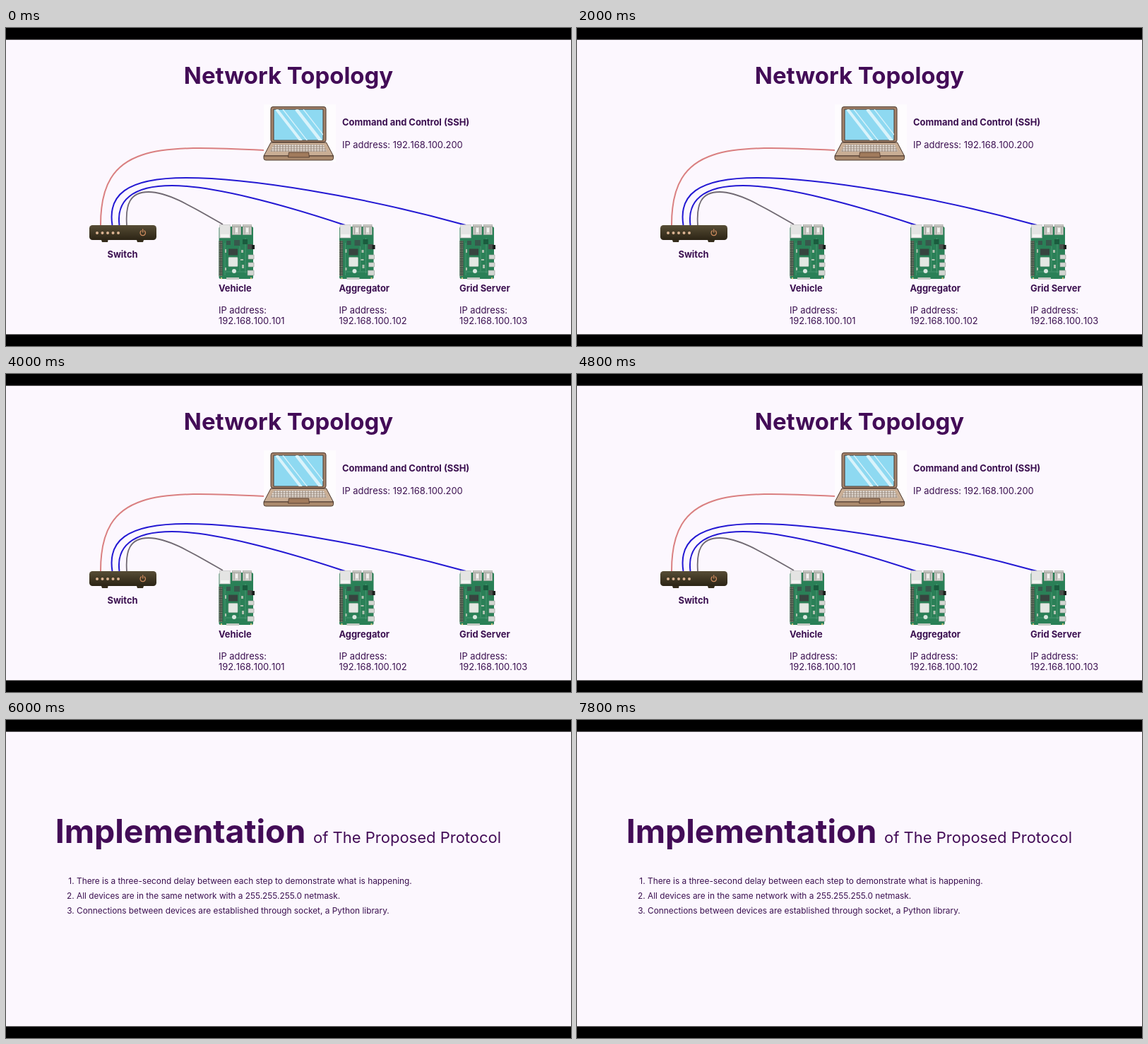
An HTML page for the animation above (8 s loop, 800 by 450 pixels).

```html
<!DOCTYPE html>
<html lang="en">
<head>
<meta charset="utf-8">
<title>Network Topology</title>
<style>
  html, body { margin: 0; width: 100%; height: 100%; overflow: hidden; background: #000; }
  svg { display: block; width: 100vw; height: 100vh; }
  text { font-family: Inter, sans-serif; font-optical-sizing: none; fill: #430c57; }
  .title { font-size: 32.95px; font-weight: 700; }
  .headline { font-size: 46.4px; font-weight: 700; }
  .subhead { font-size: 22px; }
  .label { font-size: 12.9px; fill: #3b1050; }
  .address { font-kerning: none; }
  .name { font-weight: 700; }
  .list { font-size: 11.85px; fill: #3b1050; }
  .cable { fill: none; stroke-width: 2; }
</style>
</head>
<body>
<svg viewBox="0 0 800 450">
  <defs>
    <pattern id="keys" width="4" height="3" patternUnits="userSpaceOnUse">
      <path d="M0 0h4v3h-4z" fill="#8d7b6d"/>
      <path d="M.4 .4h3.1v2.1h-3.1z" fill="#f1ebe5"/>
    </pattern>
    <pattern id="pins" width="2.6" height="2.6" patternUnits="userSpaceOnUse">
      <path d="M0 0h2.6v2.6h-2.6z" fill="#3d4d44"/>
      <circle cx="1.3" cy="1.3" r=".7" fill="#b5b394"/>
    </pattern>
    <linearGradient id="case" x2="0" y2="1">
      <stop stop-color="#574d36"/>
      <stop offset=".45" stop-color="#433a26"/>
      <stop offset="1" stop-color="#2c2415"/>
    </linearGradient>
    <clipPath id="glass"><path d="M379 115h70v44h-70z"/></clipPath>

    <!-- single-board computer, origin at its label's left edge -->
    <g id="board">
      <rect x=".5" y="2" width="48.5" height="74" rx="2.5" fill="#2a8057"/>
      <path d="M9 25v46M30 30v35M38 18v50M10 66h30" stroke="#56a07d" stroke-width=".7" fill="none"/>
      <rect x=".5" y="22" width="5.2" height="50" fill="url(#pins)"/>
      <rect x="1.5" y="-.5" width="15" height="18.500" fill="#e4e4e3" stroke="#bcbcb9" stroke-width=".6"/>
      <path d="M3 13h12v4h-12z" fill="#f4f4f2"/>
      <g id="usb">
        <rect x="19.5" y="-.5" width="12" height="14" fill="#d2d2ce" stroke="#a2a29b" stroke-width=".7"/>
        <path d="M19 2h13M22 2.500v10M29 2.500v10" stroke="#96968f" stroke-width="1"/>
        <path d="M24 4h3v6h-3z" fill="#f2f2ef"/>
      </g>
      <use href="#usb" x="15"/>
      <path d="M11 22h6v6h-6zM22 21h8v8h-8z" fill="#37584c"/>
      <path d="M34 20h7v7h-7z" fill="#1a5b3e"/>
      <rect x="14" y="33.500" width="13" height="9" fill="#37443f"/>
      <rect x="14" y="45.500" width="13" height="13" rx="1" fill="#e3e8e3" stroke="#abbaaf" stroke-width=".7"/>
      <circle cx="22" cy="65" r="3" fill="#d9e7df"/>
      <circle cx="4" cy="75" r="1.2" fill="#d1c47d"/>
      <circle cx="46" cy="75" r="1.2" fill="#d1c47d"/>
      <path d="M41 27h7v7h-7z" fill="#484f4a"/>
      <path d="M47 28h4v6h-4z" fill="#1d211f"/>
      <g fill="#d3d7d2" stroke="#949c95" stroke-width=".6">
        <path d="M42 42h8v6h-8zM42 53h8v6h-8zM41 64h9v7h-9z"/>
      </g>
      <path d="M32 35h3v4h-3zM31 48h4v2h-4zM33 56h3v5h-3zM9 34h2v5h-2zM9 60h2v4h-2z" fill="#aebfae"/>
      <path d="M11 74h18v3h-18z" fill="#c6cac4"/>
    </g>
  </defs>

  <rect y="16.6" width="800" height="416.900" fill="#fcf7fe"/>

  <g id="topology">
    <text class="title" x="400" y="78.5" text-anchor="middle">Network Topology</text>

    <g class="cable">
      <path stroke="#da8081" d="M134 279C133.500 163 213 165.500 366 173"/>
      <path stroke="#2419d3" d="M150.500 279C144 238 168 212 255 212S500 237 651 279"/>
      <path stroke="#2419d3" d="M160.500 279C156 245 178 223 235 223S390 249 480 279"/>
      <path stroke="#716a73" stroke-width="1.8" d="M171 279C169 250 175 232 202 232S262 252 307 278"/>
    </g>

    <g id="laptop">
      <path d="M365 108h102v82h-102z" fill="#fefcfe"/>
      <g stroke="#4b372c" stroke-width="1" stroke-linejoin="round">
        <rect x="375" y="111.5" width="78" height="50" rx="3" fill="#a3836a"/>
        <path d="M379 115h70v44h-70z" fill="#8ed9f1"/>
        <path d="M375 162H453.500L463.500 181H365z" fill="#c9ae95"/>
        <path d="M365 181H463.500V184.500Q463.500 187 460.500 187H368Q365 187 365 184.500z" fill="#ab8a6d"/>
        <path d="M400.500 176h28l1 7h-30z" fill="#a17b5c" stroke-width=".8"/>
      </g>
      <path d="M379.500 165H449.500L454.500 175H373.500z" fill="url(#keys)"/>
      <g clip-path="url(#glass)" stroke="#d9f3fb">
        <path d="M383 115L418 160" stroke-width="4"/>
        <path d="M392 115L427 160" stroke-width="1.3"/>
        <path d="M411 115L446 160" stroke-width="4.5"/>
        <path d="M421 115L456 160" stroke-width="1.3"/>
      </g>
    </g>

    <g id="switch">
      <path d="M134 297h11l-1 6h-8zM184 297h12l-2 6h-8z" fill="#352c1b"/>
      <rect x="118" y="279" width="95" height="21" rx="4.5" fill="url(#case)"/>
      <path d="M129 290h31" stroke="#dcb492" stroke-width="4" stroke-linecap="round" stroke-dasharray="0 7.500"/>
      <path d="M191.500 287A3.700 3.700 0 1 0 196 287M193.700 285v4"
            fill="none" stroke="#cd8a5e" stroke-width="1.3" stroke-linecap="round"/>
    </g>
    <text class="label name" x="165" y="325.3" text-anchor="middle">Switch</text>

    <text class="label name" x="476" y="138">Command and Control (SSH)</text>
    <text class="label address" x="476" y="169.500">IP address: 192.168.100.200</text>
    <g id="nodes"></g>
  </g>

  <g id="implementation" visibility="hidden">
    <text class="headline" x="69.700" y="174">Implementation</text>
    <text class="subhead" x="435" y="173.500">of The Proposed Protocol</text>
    <g id="notes"></g>
  </g>
</svg>
<script>
const byId = id => document.getElementById(id);
const label = (x, y, content, style, anchor = 'start') =>
  `<text class="${style}" x="${x}" y="${y}" text-anchor="${anchor}">${content}</text>`;

byId('nodes').innerHTML = ['Vehicle', 'Aggregator', 'Grid Server'].map((name, i) => {
  const x = 301 + i * 170.5;
  return `<use href="#board" x="${x}" y="279"/>` +
    label(x, 372.5, name, 'label name') +
    label(x, 403.5, 'IP address:', 'label address') +
    label(x, 419.2, `192.168.100.${101 + i}`, 'label address');
}).join('');

byId('notes').innerHTML = [
  'There is a three-second delay between each step to demonstrate what is happening.',
  'All devices are in the same network with a 255.255.255.0 netmask.',
  'Connections between devices are established through socket, a Python library.'
].map((note, i) => {
  const y = 231.5 + i * 21.1;
  return label(96.6, y, `${i + 1}.`, 'list', 'end') + label(100, y, note, 'list');
}).join('');

const LOOP = 8000, CUT = 6000;
const show = (id, on) => byId(id).setAttribute('visibility', on ? 'visible' : 'hidden');
const start = performance.now();

function draw() {
  const onTopology = (performance.now() - start) % LOOP < CUT;
  show('topology', onTopology);
  show('implementation', !onTopology);
  requestAnimationFrame(draw);
}
draw();
</script>
</body>
</html>
```
